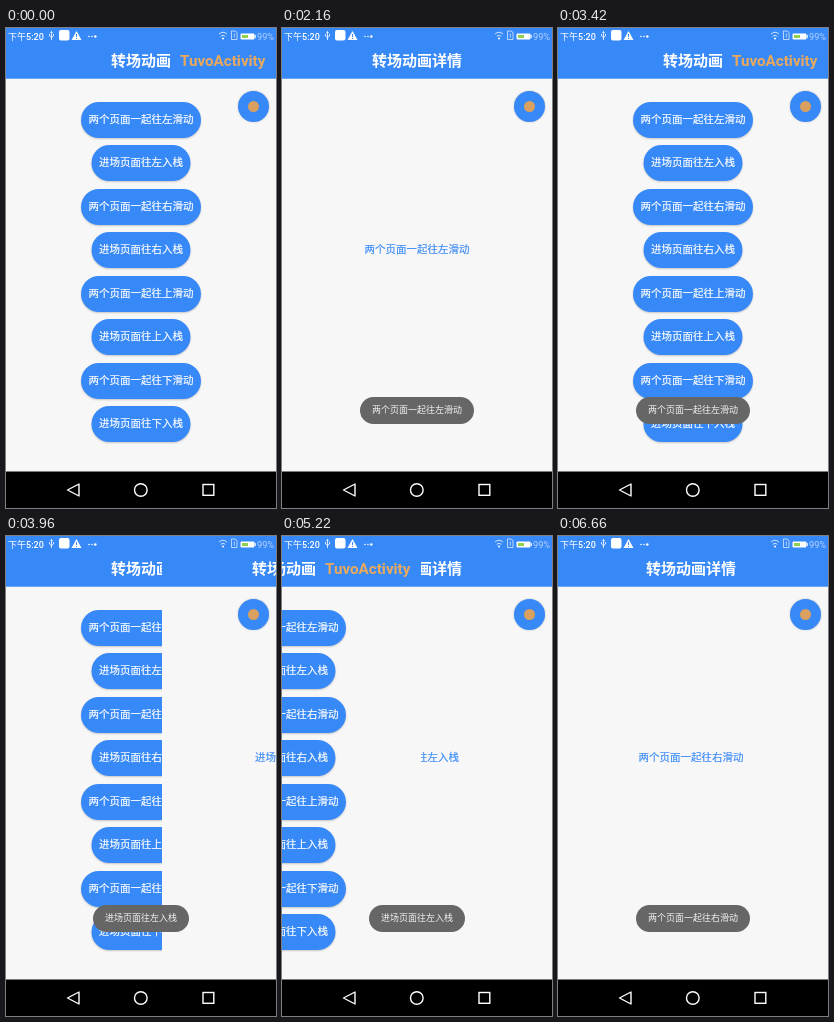
These frames come from a looping animation (270 px wide and 480 px high, 6840 ms). An HTML page:

```html
<!DOCTYPE html>
<html lang="zh-CN">
<head>
<meta charset="utf-8">
<title>转场动画</title>
<style>
  :root { --blue: #3889f8; --orange: #e9a95c; }
  html, body { margin: 0; width: 100%; height: 100%; overflow: hidden; }
  body { font-family: Roboto, "Noto Sans CJK SC", "Noto Sans CJK", sans-serif; }
  #stage { position: relative; width: 270px; height: 480px; overflow: hidden; background: #f7f7f7; }
  .page { position: absolute; inset: 0 0 36px; background: #f7f7f7; }
  .bar { height: 50px; background: var(--blue); border-bottom: 1px solid #6aa7f8; }
  .bar b, .text, .pill, #toast { position: absolute; white-space: nowrap; text-align: center; }
  .bar b { top: 23px; left: 0; width: 270px; font-size: 15px; line-height: 20px; color: #fff; }
  .bar .name { left: 174px; width: auto; font-size: 15.2px; color: var(--orange); }
  .pill {
    left: 135px; height: 36px; padding: 0 7.5px; transform: translateX(-50%);
    border-radius: 18px; background: var(--blue); color: #fff;
    font-size: 10.5px; line-height: 36px; -webkit-text-stroke: .2px;
    box-shadow: 0 1px 2px rgba(0, 0, 0, .2);
  }
  .text {
    top: 212px; width: 270px; font-size: 10.5px; line-height: 20px; color: var(--blue);
    -webkit-text-stroke: .15px;
  }
  #toast {
    top: 369px; left: 135px; height: 27px; padding: 0 12px; transform: translateX(-50%);
    z-index: 3; border-radius: 14px; background: #666; color: #f2f2f2;
    font-size: 9px; line-height: 27px;
  }
  #fab {
    position: absolute; z-index: 3; left: 232px; top: 63px; width: 31px; height: 31px;
    border-radius: 50%; background: var(--blue); box-shadow: 0 0 2px rgba(0, 0, 0, .25);
  }
  #fab::after {
    content: ""; position: absolute; left: 10px; top: 10px; width: 11px; height: 11px;
    border-radius: 50%; background: #d9a05f;
  }
  svg { position: absolute; z-index: 4; left: 0; top: 0; }
</style>
</head>
<body>
<div id="stage">
  <div class="page" id="main">
    <div class="bar"><b>转场动画</b><b class="name">TuvoActivity</b></div>
  </div>
  <div class="page" id="detail">
    <div class="bar"><b>转场动画详情</b></div>
    <div class="text" id="label"></div>
  </div>
  <div id="fab"></div>
  <div id="toast"></div>
  <svg width="270" height="480" fill="none" stroke="#fff">
    <g font-size="9" fill="#fff" stroke="none">
      <text x="2" y="11.5">下午<tspan font-weight="500">5:20</tspan></text>
      <text x="251" y="11.5" font-size="9.2" fill="#b4d3ff">99%</text>
      <rect x="53" y="2" width="10.5" height="10.5" rx="2"/>
      <path d="M70.5 3l5 9h-10z"/>
      <circle cx="83" cy="8.5" r=".8"/><circle cx="86" cy="8.5" r=".8"/><circle cx="89.3" cy="8.5" r="1.3"/>
      <circle cx="217" cy="10.5" r="1"/>
      <rect x="234.5" y="5.5" width="14" height="6" rx="1"/>
      <path d="M236 7h6v3h-6z" fill="#8fd04c"/>
    </g>
    <path d="M70.5 6v3m0 1v1" stroke="var(--blue)"/>
    <path d="M45.5 3.500v8.500M43.500 6v2l2 1.500 2-1.500V6M44.500 5l1-1.500 1 1.500" stroke-width=".8"/>
    <path d="M213 6q4-3.500 8 0M214.700 8.300q2.300-2 4.600 0" stroke-width=".9" opacity=".8"/>
    <path d="M225.500 3h3.500l2 1.500v7h-5.500zM228.300 5.500v4" stroke-width=".8" opacity=".8"/>
    <path d="M249.300 7v3"/>
    <path d="M0 443.500h270V480H0z" fill="#000" stroke="none"/>
    <g stroke-width="1.400">
      <path d="M61.500 462l11.500-6v12z" stroke-linejoin="round"/>
      <circle cx="134.800" cy="462" r="6.300"/>
      <rect x="197" y="456.500" width="10.800" height="10.800"/>
    </g>
  </svg>
</div>
<script>
  const LOOP = 6840, TICK = 180, SLIDE = 805, WIDTH = 270;
  const $ = id => document.getElementById(id);
  const main = $('main'), detail = $('detail'), label = $('label'), toast = $('toast');

  const both = way => `两个页面一起往${way}滑动`;
  const over = way => `进场页面往${way}入栈`;

  [...'左右上下'].flatMap(way => [both(way), over(way)]).forEach((text, i) => {
    const pill = document.createElement('div');
    pill.className = 'pill';
    pill.textContent = text;
    pill.style.top = 73.5 + i * 43.5 + 'px';
    main.append(pill);
  });

  // Page positions are in screen widths: [from, to].
  const steps = [
    { at: -SLIDE, main: [0, 0], detail: [1, 1], text: '' },
    { at: 270, main: [0, -1], detail: [1, 0], text: both('左') },
    { at: 2610, main: [-1, 0], detail: [0, 1], text: both('左') },
    { at: 3598, main: [0, 0], detail: [1, 0], text: over('左') },
    { at: 4810, main: [-1, 0], detail: [0, 0], text: over('左'), mainOnTop: true },
    { at: 5894, main: [0, 1], detail: [-1, 0], text: both('右') }
  ];

  const ease = t => (1 - Math.cos(Math.PI * Math.min(t, 1))) / 2;
  const place = (page, [from, to], p) => {
    page.style.transform = `translateX(${Math.round((from + (to - from) * p) * WIDTH)}px)`;
  };

  function draw(now) {
    const time = Math.floor((now % LOOP) / TICK) * TICK;
    const step = steps.findLast(s => s.at <= time);
    const p = ease((time - step.at) / SLIDE);
    place(main, step.main, p);
    place(detail, step.detail, p);
    main.style.zIndex = step.mainOnTop ? 2 : 0;
    detail.style.zIndex = 1;
    label.textContent = toast.textContent = step.text;
    toast.style.visibility = step.text ? 'visible' : 'hidden';
  }

  const begin = performance.now();
  function frame() {
    draw(performance.now() - begin);
    requestAnimationFrame(frame);
  }
  frame();
</script>
</body>
</html>
```
